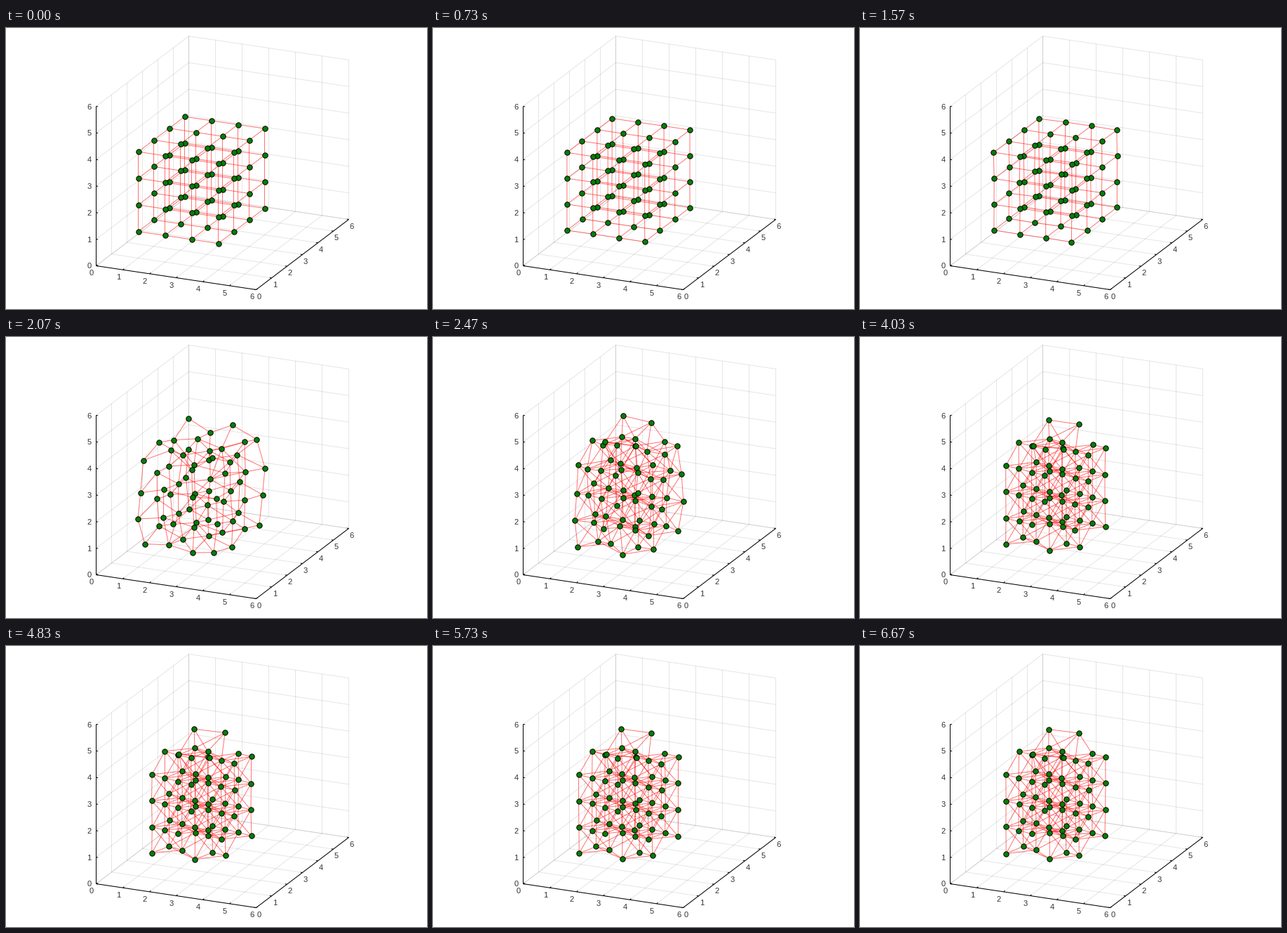
A matplotlib script that plays this animation: 600x400 px, repeating every 6.71 s.

```python
import numpy as np
import matplotlib.pyplot as plt
from matplotlib.animation import FuncAnimation
from matplotlib.collections import LineCollection

FRAMES, LOOP_MS, FPS = 201, 6710, 30
PX = 0.72            # one pixel in points at 100 dpi
BOND = 1.18          # atoms closer than this are joined

# Orthographic view: screen = ORIGIN + VIEW @ (x, y, z)
ORIGIN = np.array([128, 338])
VIEW = np.array([[38, 22, 0], [34 / 6, -100 / 6, -227 / 6]])


def project(p):
    return ORIGIN + np.asarray(p) @ VIEW.T


def smooth(t, a, b):
    s = np.clip((t - a) / (b - a), 0, 1)
    return s * s * (3 - 2 * s)


def packed(i, j, k):
    """Close-packed columns; neighbours sit half a step higher."""
    odd = (i + j) % 2
    x = 1.595 + 0.795 * i
    y = 0.86 + 0.84 * j + 0.03 * i - 0.3 * (i % 2)
    z = 1 + 0.5 * odd + 0.99 * k
    # the top atom of a raised edge column leans inward onto the cap
    cap = (odd == 1) & (j % 3 == 0) & (k == 3)
    x = np.where(cap, x + 0.3 * (2.8 - x), x)
    y = np.where(cap, y + 0.3 * (2.05 - y), y)
    z = np.where(cap, 4.8, z)
    return np.stack([x, y, z], axis=1)


def barrel(p, k):
    """Outward bulge of the middle layers with a vertical stretch."""
    x, y, z = p.T
    belly = 0.1 * np.sin(np.pi * k / 3)
    return np.stack([(x - 2.8) * belly, (y - 2.05) * belly, 0.07 * (z - 3)],
                    axis=1)


I, J, K = (axis.ravel() for axis in np.indices((4, 4, 4)))
LATTICE = np.stack([I, J, K], axis=1) + 1.0
RELAXED = packed(I, J, K)
SHAKE = barrel(RELAXED, K)

rng = np.random.default_rng(4)
FREQ = rng.uniform(1.2, 2.6, (64, 3))
PHASE = rng.uniform(0, 2 * np.pi, (64, 3))
PAIRS = np.triu_indices(64, 1)


def atoms(t):
    scale = 0.977 + 0.023 * np.exp(-t / 0.9) * np.cos(2 * np.pi * t)
    cube = 2.5 + (LATTICE - 2.5) * scale
    w = smooth(t, 1.7, 2.47)
    kick = 1.25 * smooth(t, 1.65, 2.1) * (1 - smooth(t, 2.2, 3.2))
    heat = 0.01 * smooth(t, 0, 1.5) + 0.04 * kick
    jitter = heat * np.sin(2 * np.pi * FREQ * t + PHASE)
    return cube * (1 - w) + RELAXED * w + SHAKE * kick + jitter


def bonds(p):
    a, b = PAIRS
    near = np.linalg.norm(p[a] - p[b], axis=1) < BOND
    return a[near], b[near]


fig = plt.figure(figsize=(6, 4), dpi=100, facecolor="white")
ax = fig.add_axes([0, 0, 1, 1])
ax.set_xlim(-0.5, 599.5)
ax.set_ylim(399.5, -0.5)
ax.axis("off")


def lines(segments, color, alpha=1.0, z=1):
    art = LineCollection([project(s) for s in segments], colors=color,
                         linewidths=PX, alpha=alpha, zorder=z, snap=False)
    return ax.add_collection(art)


def draw_box():
    grid, ticks = [], []
    for k in range(7):
        grid += [[(k, 0, 0), (k, 6, 0)], [(0, k, 0), (6, k, 0)],
                 [(0, k, 0), (0, k, 6)], [(0, 0, k), (0, 6, k)],
                 [(k, 6, 0), (k, 6, 6)], [(0, 6, k), (6, 6, k)]]
        ticks += [[(k, 0, 0), (k, 0.09, 0)], [(6, k, 0), (5.93, k, 0)],
                  [(0, 0, k), (0.07, 0, k)]]
        for point, dx, dy in (((k, 0, 0), -6.5, 11), ((6, k, 0), 4.5, 10),
                              ((0, 0, k), -10, 1)):
            x, y = project(point)
            ax.text(x + dx, y + dy, str(k), family="Liberation Sans", size=8,
                    color="#333333", ha="center", va="center")
    lines(grid, "black", 0.1)
    lines(ticks, "black", z=2)
    lines([[(0, 0, 6), (0, 0, 0)], [(0, 0, 0), (6, 0, 0)],
           [(6, 0, 0), (6, 6, 0)]], "black", z=2)


draw_box()
links = lines([], "red", 0.55, 3)
dots, = ax.plot([], [], "o", ms=7.4 * PX, mfc="green", mec="black",
                mew=PX, zorder=4, snap=False)


def update(frame):
    p = atoms(frame / FPS)
    a, b = bonds(p)
    xy = project(p)
    links.set_segments(np.stack([xy[a], xy[b]], axis=1))
    dots.set_data(xy[:, 0], xy[:, 1])
    return links, dots


anim = FuncAnimation(fig, update, frames=FRAMES, interval=LOOP_MS / FRAMES,
                     repeat=True, repeat_delay=0, blit=False)
plt.show()
```
